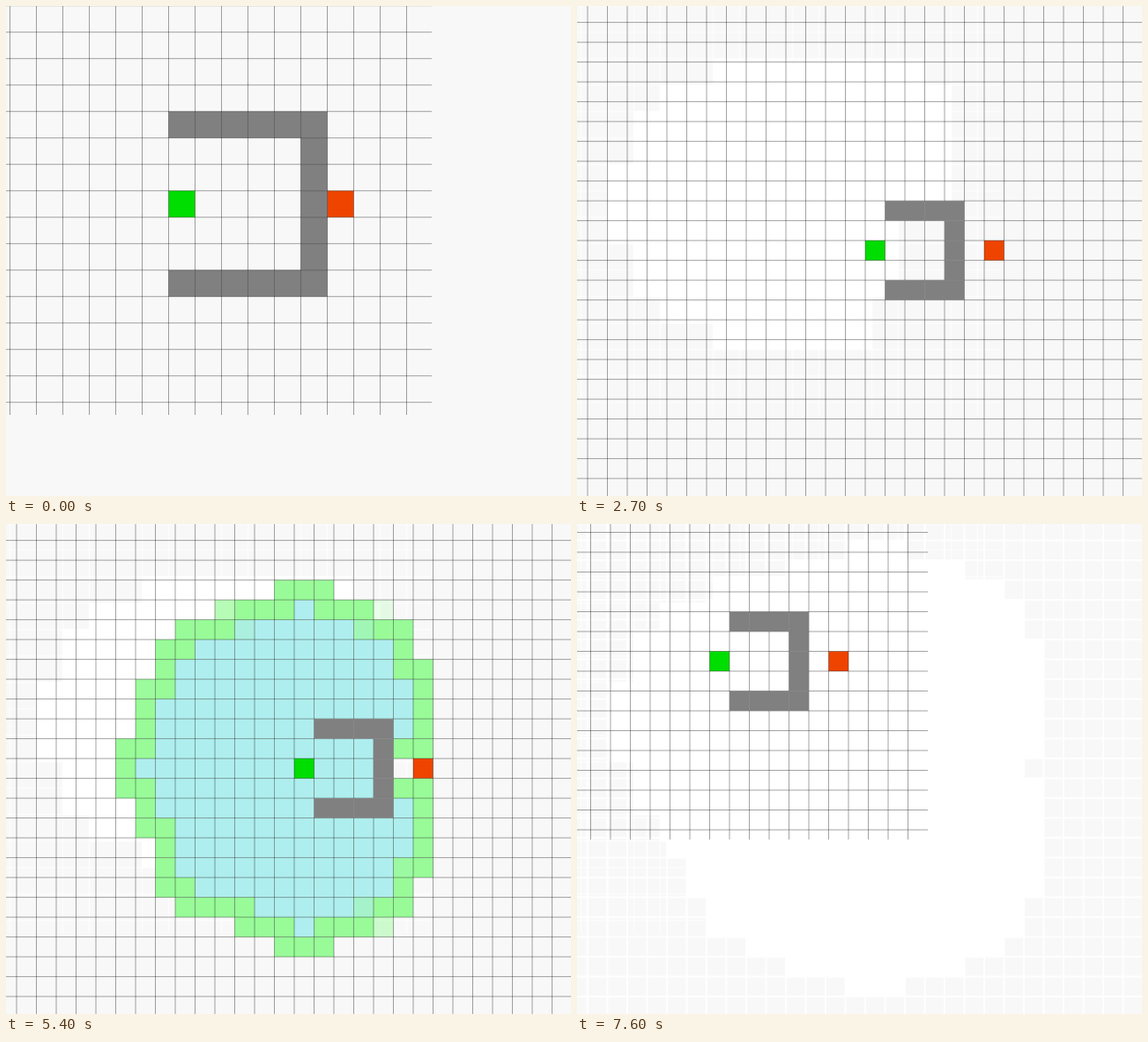
These frames come from a looping animation (641 by 556 pixels, 8 s). An HTML page with a canvas:

```html
<!DOCTYPE html>
<html lang="en">
<head>
<meta charset="utf-8">
<title>Grid search</title>
<style>
  html, body { margin: 0; width: 641px; height: 556px; overflow: hidden; background: #f8f8f8; }
  canvas { display: block; }
</style>
</head>
<body>
<canvas id="stage" width="641" height="556"></canvas>
<script>
const W = 641, H = 556, LOOP = 8000, FADE = 48;
const ctx = document.getElementById('stage').getContext('2d');
const key = (x, y) => x + ',' + y;
const clamp = v => Math.max(0, Math.min(1, v));

// Binary heap with a fixed order for ties
class Heap {
  constructor() { this.a = []; }
  rise(start, pos) {
    const a = this.a, item = a[pos];
    while (pos > start) {
      const up = (pos - 1) >> 1;
      if (item.f >= a[up].f) break;
      a[pos] = a[up];
      pos = up;
    }
    a[pos] = item;
  }
  push(n) { this.a.push(n); this.rise(0, this.a.length - 1); }
  update(n) { this.rise(0, this.a.indexOf(n)); }
  pop() {
    const a = this.a, last = a.pop();
    if (!a.length) return last;
    const top = a[0];
    a[0] = last;
    let pos = 0, child = 1;
    while (child < a.length) {
      if (child + 1 < a.length && a[child].f >= a[child + 1].f) child++;
      a[pos] = a[child];
      pos = child;
      child = 2 * pos + 1;
    }
    a[pos] = last;
    this.rise(0, pos);
    return top;
  }
}

// A bracket of walls open to the left
function bracket(x0, x1, y0, y1) {
  const cells = [];
  for (let x = x0; x <= x1; x++) cells.push([x, y0], [x, y1]);
  for (let y = y0 + 1; y < y1; y++) cells.push([x1, y]);
  return cells;
}

const STEPS = [[0, -1], [1, 0], [0, 1], [-1, 0], [-1, -1], [1, -1], [1, 1], [-1, 1]];

function search(scene, guided) {
  const walls = new Set(scene.walls.map(c => key(...c)));
  const free = (x, y) => x >= 0 && y >= 0 && x < 40 && y < 30 && !walls.has(key(x, y));
  const nodes = new Map(), ops = [], heap = new Heap();
  const node = (x, y) => {
    const k = key(x, y);
    if (!nodes.has(k)) nodes.set(k, { x, y, g: 0, f: 0 });
    return nodes.get(k);
  };
  const [gx, gy] = scene.goal;
  const first = node(...scene.start);
  first.opened = true;
  heap.push(first);
  while (heap.a.length) {
    const n = heap.pop();
    n.closed = true;
    ops.push({ n, kind: 'shut' });
    if (n.x === gx && n.y === gy) break;
    for (const [dx, dy] of STEPS) {
      const x = n.x + dx, y = n.y + dy;
      if (!free(x, y)) continue;
      const sideA = free(x, n.y), sideB = free(n.x, y);
      if (dx && dy && !sideA && !sideB) continue;
      const m = node(x, y);
      if (m.closed) continue;
      const g = n.g + (dx && dy ? Math.SQRT2 : 1);
      if (m.opened && g >= m.g) continue;
      m.g = g;
      m.f = g + (guided ? Math.abs(x - gx) + Math.abs(y - gy) : 0);
      m.parent = n;
      if (m.opened) {
        heap.update(m);
      } else {
        m.opened = true;
        heap.push(m);
        ops.push({ n: m, kind: 'open', late: dx && dy && !(sideA && sideB) ? 40 : 0 });
      }
    }
  }
  scene.path = [];
  for (let n = node(gx, gy); n; n = n.parent) scene.path.push([n.x, n.y]);
  scene.nodes = [...nodes.values()];
  return ops;
}

// Spread the operations over time between key moments
function schedule(scene, ops) {
  const marks = scene.marks.map(([t, cell]) => [
    cell === 'first' ? 0 : cell === 'last' ? ops.length - 1
      : ops.findIndex(o => o.kind === 'shut' && key(o.n.x, o.n.y) === cell), t]);
  ops.forEach((o, i) => {
    let s = 0;
    while (s < marks.length - 2 && i > marks[s + 1][0]) s++;
    const [i0, t0] = marks[s], [i1, t1] = marks[s + 1];
    o.n[o.kind] = t0 + (t1 - t0) * (i - i0) / (i1 - i0) + (o.late || 0);
  });
  scene.done = marks[marks.length - 1][1];
}

const scenes = [
  { from: 0, x0: 4.5, y0: -0.3, size: 30, w: 483, h: 464, start: [6, 7], goal: [12, 7],
    walls: bracket(6, 11, 4, 10), lined: true, ghost: [1.5, 0.6],
    marks: [[875, 'first'], [1386, '5,10'], [1785, 'last']] },
  { from: 2700, x0: 12, y0: 18.6, size: 22.5, w: W, h: H, start: [14, 11], goal: [20, 11],
    walls: bracket(15, 18, 9, 13), ghost: [2, 0.9],
    marks: [[3275, 'first'], [3885, '16,7'], [5385, '17,4'], [5990, '17,19'], [6785, 'last']] },
  { from: 7600, x0: 15.5, y0: 9.5, size: 22.5, w: 398, h: 358, start: [6, 6], goal: [12, 6],
    walls: bracket(7, 10, 4, 8) }
];
schedule(scenes[0], search(scenes[0], true));
schedule(scenes[1], search(scenes[1], false));

function cell(s, x, y, color, alpha = 1, grow = 0) {
  if (alpha <= 0) return;
  ctx.globalAlpha = alpha;
  ctx.fillStyle = color;
  ctx.fillRect(s.x0 + x * s.size - grow, s.y0 + y * s.size - grow, s.size + 2 * grow, s.size + 2 * grow);
  ctx.globalAlpha = 1;
}

function lines(s, color, width) {
  ctx.fillStyle = color;
  for (let x = s.x0; x < s.w - 1; x += s.size) ctx.fillRect(x - width / 2, 0, width, s.h);
  for (let y = s.y0; y < s.h - 1; y += s.size) ctx.fillRect(0, y - width / 2, s.w, width);
}

// Cleared cells and old grid lines stay behind in white
function residue(s) {
  lines(s, `rgba(255,255,255,${s.ghost[1]})`, s.ghost[0]);
  for (const n of s.nodes) if (n.opened) cell(s, n.x, n.y, '#fff', 1, 0.5);
  for (const [x, y] of s.walls) cell(s, x, y, '#fff', 1, 0.5);
}

function drawPath(s) {
  ctx.beginPath();
  for (const [x, y] of s.path) ctx.lineTo(s.x0 + (x + 0.5) * s.size, s.y0 + (y + 0.5) * s.size);
  ctx.strokeStyle = '#ff0';
  ctx.lineWidth = s.size / 10;
  ctx.stroke();
}

function draw(t) {
  ctx.fillStyle = '#f8f8f8';
  ctx.fillRect(0, 0, W, H);
  let i = scenes.length - 1;
  while (scenes[i].from > t) i--;
  scenes.slice(0, i).forEach(residue);

  const s = scenes[i];
  const walls = () => s.walls.forEach(([x, y]) => cell(s, x, y, '#808080'));
  for (const n of s.nodes || []) {
    const shut = clamp((t - n.shut) / FADE) || 0;
    if (shut < 1) cell(s, n.x, n.y, '#98fb98', clamp((t - n.open) / FADE) || 0);
    cell(s, n.x, n.y, '#afeeee', shut);
  }
  cell(s, ...s.start, '#00dd00');
  cell(s, ...s.goal, '#ee4400');
  if (s.lined) walls();
  lines(s, 'rgba(0,0,0,0.36)', 1);
  if (!s.lined) walls();
  if (s.path && t >= s.done) drawPath(s);
}

function tick() {
  draw(performance.now() % LOOP);
  requestAnimationFrame(tick);
}
tick();
</script>
</body>
</html>
```
